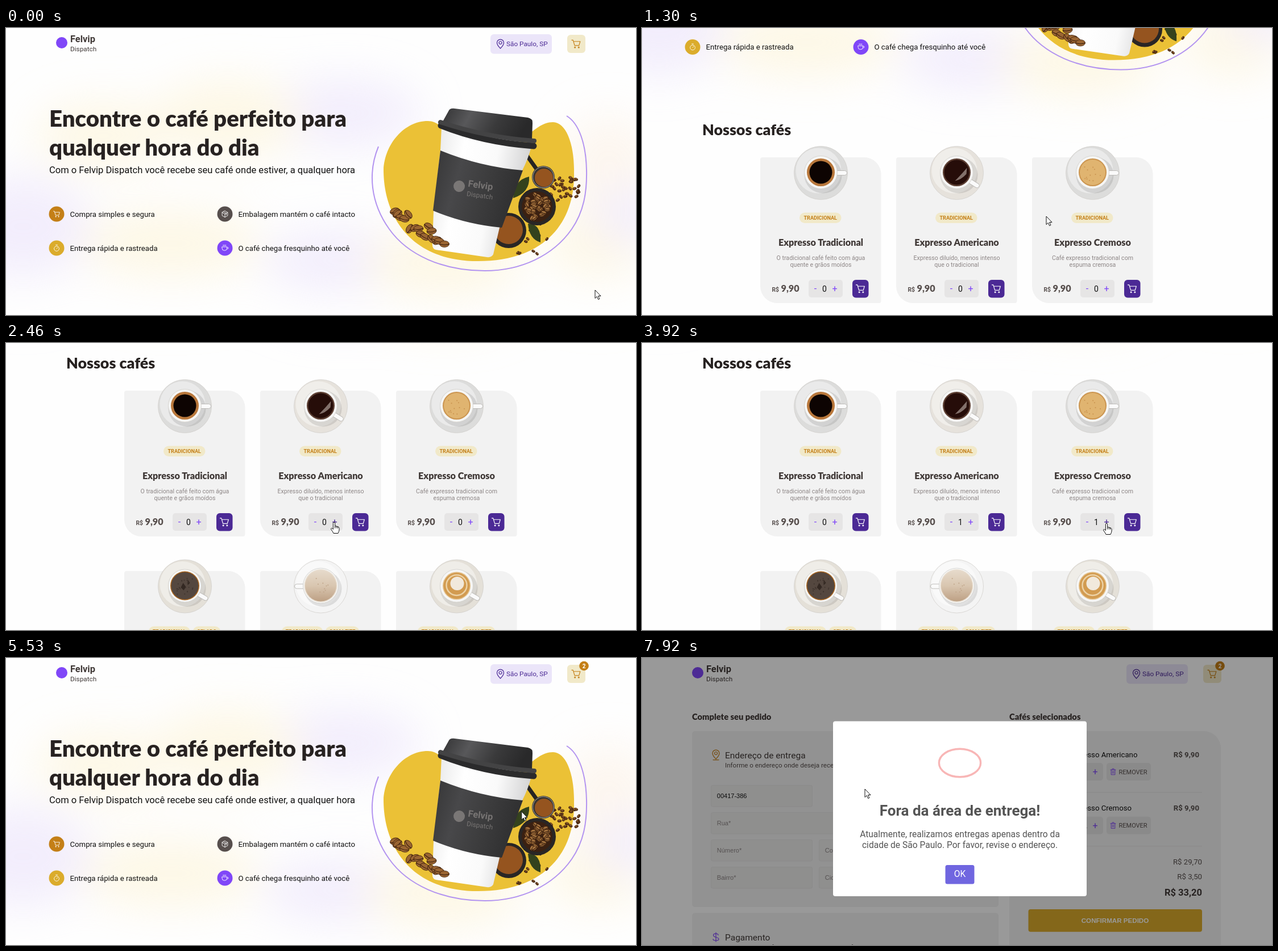
These frames come from a looping animation (1108x506 px, 8000 ms). An HTML page:

```html
<!DOCTYPE html>
<html lang="pt-BR">
<head>
<meta charset="utf-8">
<title>Felvip Dispatch</title>
<style>
  html, body { margin: 0; width: 100%; height: 100%; overflow: hidden; background: #fefefe; }
  svg { display: block; width: 1108px; height: 506px; }
  text { font-family: Roboto, sans-serif; white-space: pre; }
  .title { font-family: Lato, sans-serif; font-weight: 900; }
  .form { font-family: "Liberation Sans", Arial, sans-serif; }
  .bold { font-weight: 700; }
  .mid { text-anchor: middle; }
  .end { text-anchor: end; }
  .icon { fill: none; stroke-linecap: round; stroke-linejoin: round; }
</style>
</head>
<body>
<svg id="stage" viewBox="0 0 1108 506"></svg>
<script>
const LOOP = 8000;
const PURPLE = '#8047f8', DARK_PURPLE = '#4b2995', ORANGE = '#c47f17', GOLD = '#dbac2c';
const CREAM = '#f1e9c9', CARD = '#f2f2f2', GREY = '#e6e5e5', INK = '#403937', SOFT = '#574f4d', MUTED = '#8d8686';
const ROW1 = 582.5, ROW2 = 900.5, CARD_X = [208, 447, 686];

let seed = 77;
const random = () => (seed = seed * 16807 % 2147483647) / 2147483647;
const spread = r => (random() * 2 - 1) * r;
const repeat = (n, fn) => Array.from({ length: n }, (_, i) => fn(i)).join('');

// ---- drawing helpers ----
const text = (x, y, str, size, fill, cls = '', id = '') =>
  `<text x="${x}" y="${y}" font-size="${size}" fill="${fill}" class="${cls}" id="${id}">${str}</text>`;
const rect = (x, y, w, h, r, fill, more = '') =>
  `<rect x="${x}" y="${y}" width="${w}" height="${h}" rx="${r}" fill="${fill}" ${more}/>`;
const circle = (x, y, r, fill, more = '') => `<circle cx="${x}" cy="${y}" r="${r}" fill="${fill}" ${more}/>`;
const ellipse = (x, y, rx, ry, fill, more = '') =>
  `<ellipse cx="${x}" cy="${y}" rx="${rx}" ry="${ry}" fill="${fill}" ${more}/>`;
const path = (d, fill, more = '') => `<path d="${d}" fill="${fill}" ${more}/>`;
const icon = (name, x, y, color, scale = 1, id = '') =>
  `<path class="icon" id="${id}" d="${ICONS[name]}" stroke="${color}" stroke-width="1.25" transform="translate(${x} ${y}) scale(${scale})"/>`;
const leafCard = (x, y, w, h) => path(
  `M${x + 4} ${y}h${w - 34}a30 30 0 0 1 30 30v${h - 34}a4 4 0 0 1-4 4h${34 - w}a30 30 0 0 1-30-30v${34 - h}a4 4 0 0 1 4-4z`, CARD);

const ICONS = {
  cart: 'M-8-7h2.5l3 10h8l2.2-7.5h-12.2M-2 5.5a1 1 0 1 0 .1 0M5 5.5a1 1 0 1 0 .1 0',
  pin: 'M0 8C-4 4-6 1-6-2a6 6 0 0 1 12 0C6 1 4 4 0 8zM0-4.5a2.5 2.5 0 1 0 .1 0',
  box: 'M0-8L7-4V4L0 8L-7 4V-4zM-7-4L0 0L7-4M0 0V8M-3.5-6L3.5-2V2',
  timer: 'M0-5a6.3 6.3 0 1 0 .1 0M0 1.5L2.8-1.5M-2-8h4',
  cup: 'M-7-3H5V1A5 5 0 0 1 0 6H-2A5 5 0 0 1-7 1zM5-2h1.5a2 2 0 0 1 0 4H5M-4-8v2.5M-1-8v2.5M2-8v2.5',
  dollar: 'M0-8V8M4-3.5C4-7-4.5-7-4.5-3.2C-4.5 1 5 0 5 3.5C5 7-5 7-5 3.5',
  trash: 'M-6-4.5H6M-2-4.5V-7H2V-4.5M-4.5-4.5V7H4.5V-4.5M-1.5-1.5V4M1.5-1.5V4',
  baseline: 'M-5 8H5'
};

const specks = (n, color) => repeat(n, () => circle(spread(14), spread(14), 1, color));
const COFFEES = [
  { liquid: '#0d0402', crema: '#b9783c', radius: 20, angle: 0, saucer: '#dcdcdb', art: '' },
  { liquid: '#260d09', crema: '#5b3d31', radius: 22, angle: 32, saucer: '#e6e2dc',
    art: path('M-3 14Q8 12 17 2L18-9Q8 3-3 14', '#9a8a83', 'opacity=".8"') },
  { liquid: '#e0b470', crema: '#cb9550', radius: 22.5, angle: 0, saucer: '#dcdcdb', art: specks(12, '#c8924e') },
  { liquid: '#54473f', crema: '#a8641e', radius: 24, angle: 30, saucer: '#e4e0d8',
    art: path('M-7 2L-3-6L2 1L-2 7ZM5-12L9-6L5-2Z', '#332822') + specks(24, '#40352f') },
  { liquid: 'url(#milk)', crema: '#e9dfd2', radius: 27.5, angle: 180, saucer: '#f4f4f4', art: specks(9, '#c0a58a') },
  { liquid: '#d29b50', crema: '#e3c08a', radius: 23, angle: 30, saucer: '#e4e0d8',
    art: circle(0, -2, 18, 'none', 'stroke="#ecd2a6" stroke-width="2.5"') + circle(1, -5, 12, '#f1e9dc') }
];
function coffee(kind, x, y, scale = 1) {
  const { liquid, crema, radius, angle, saucer, art } = COFFEES[kind];
  return `<g transform="translate(${x} ${y}) scale(${scale})">` +
    circle(0, 0, 47, saucer, 'stroke="#d2d0cc" stroke-width=".8"') + circle(-4, -4, 40, '#fff', 'opacity=".4"') +
    ellipse(4, 4, 33, 32, '#000', 'opacity=".1"') +
    `<g transform="rotate(${angle})">` + rect(24, -4, 22, 8, 4, '#fafafa', 'stroke="#b8b6b3" stroke-width=".9"') + '</g>' +
    circle(0, -1, Math.max(29, radius + 3.5), '#f6f6f5', 'stroke="#cfcdca" stroke-width=".8"') +
    circle(0, -1, Math.max(24.5, radius + 1.5), crema) + circle(0, -1, radius, liquid) + art + '</g>';
}

const bean = (x, y, r, fill = '#9a6532') => `<g transform="translate(${x} ${y}) rotate(${spread(60)})">` +
  ellipse(0, 0, r, r * .66, fill, 'stroke="#3a1d0b" stroke-width=".8"') +
  path(`M${-r} 0Q0 ${r * .4} ${r} 0`, 'none', 'stroke="#2d1508" stroke-width="1"') + '</g>';

const logo = (ink, mark, cx) => circle(cx, 26, 10, mark) +
  text(113, 24.5, 'Felvip', 16.4, ink, 'bold') + text(113, 41, 'Dispatch', 11.8, ink);

const counter = (x, y, n, id) => rect(x, y, 60, 31, 5, GREY) +
  text(x + 9.5 + 2.5, y + 20.5, '-', 16, PURPLE, 'mid') +
  text(x + 28, y + 20.5, n, 14, '#111', 'mid', id && 'count' + id) +
  text(x + 46, y + 21, '+', 16, PURPLE, 'mid', id && 'plus' + id);

const tag = (x, y, w, label) => rect(x, y, w, 18.5, 9.2, CREAM) + text(x + w / 2, y + 12.7, label, 9.1, ORANGE, 'mid bold');

// ---- home page ----
function backdrop() {
  const lavender = '#e9e0fb', yellow = '#fdf3d3', peach = '#fcf0e2';
  const blobs = [
    [30, 350, 120, 90, lavender], [590, 150, 140, 60, lavender], [590, 410, 140, 55, lavender], [170, 190, 120, 60, yellow],
    [390, 160, 130, 70, yellow], [290, 380, 160, 60, yellow], [770, 415, 140, 60, yellow],
    [1060, 240, 80, 85, peach], [1040, 380, 90, 60, yellow], [1095, 330, 60, 50, lavender]
  ];
  return '<g filter="url(#soft)" opacity=".55">' + blobs.map(([x, y, rx, ry, c]) => ellipse(x, y, rx, ry, c)).join('') + '</g>';
}

function heroPicture() {
  return path('M664 250C666 205 700 164 742 164C775 164 790 220 850 220C905 220 925 166 962 166C985 166 1000 205 999 255C1001 335 955 411 830 411C710 411 664 330 664 250Z', '#ebc136') +
    path('M655 209C636 255 641 308 674 354.5C706 400 768 428 842 428C905 428 962 402 995 354.5C1016 324 1022 290 1021 250C1020 205 1008 168 986 155', 'none', 'stroke="#b394f0" stroke-width="2"') +
    repeat(34, () => bean(980 + spread(28), 284 + spread(20), 3.4)) +
    repeat(14, () => bean(925 + spread(40), 372 + spread(28), 3)) +
    path('M914 222L934 250', 'none', 'stroke="#262424" stroke-width="7" stroke-linecap="round"') +
    circle(945, 263, 20, '#383533') + circle(945, 263, 18.5, 'none', 'stroke="#a5a19d" stroke-width="1"') + circle(946, 264, 16, '#95541f') +
    path('M892 300Q893 268 920 262Q922 290 892 300M918 345Q942 345 940 378Q920 372 918 345', '#34421d') +
    circle(884, 357, 31, '#292625') + circle(884, 356, 25, '#95541f') + circle(934, 315, 33, '#292625') + circle(934, 315, 27, '#3b2112') +
    repeat(48, () => { const a = random() * 6.28, r = Math.sqrt(random()) * 22; return bean(934 + r * Math.cos(a), 315 + r * Math.sin(a), 5, '#a4733f'); }) +
    path('M766 174L924 209Q918 232 908 251L868 352L857 399Q854 405 846 404L756 391Q749 389 750 380L752 322L764 216Z', 'url(#paper)') +
    path('M764 216Q835 245 909 251L872 352Q808 346 751 322Z', 'url(#sleeve)') +
    `<g transform="translate(797 279) rotate(8) translate(-98 -26)" opacity=".75">${logo('#8b8785', '#8b8785', 98)}</g>` +
    path('M765 172Q840 202 928 208', 'none', 'stroke="#2b2b2c" stroke-width="11" stroke-linecap="round"') +
    path('M778 147Q780 141 789 142L918 158Q927 160 926 168L925 196Q840 190 768 165Z', 'url(#lid)') +
    path('M764 166Q845 193 929 199', 'none', 'stroke="#434344" stroke-width="8" stroke-linecap="round"') +
    repeat(18, i => bean(681 + i * 5.3 + spread(4), 323 + i * 3.4 + spread(15) * Math.sin(i / 17 * Math.PI), 8.5));
}

const feature = (x, y, color, name, label) =>
  circle(x, y, 13.5, color) + icon(name, x, y, '#fff', .7) + text(x + 23.5, y + 4.7, label, 13.2, '#111');

function product(i, name, lines) {
  const x = CARD_X[i], mid = x + 106.5, y = ROW1;
  return leafCard(x, y, 212.5, 257) + coffee(i, mid, y + 27.5) + tag(x + 69, y + 97.5, 73.5, 'TRADICIONAL') +
    text(mid, y + 156, name, 16.2, INK, 'title mid') +
    lines.map((line, k) => text(mid, y + 180.5 + k * 12, line, 10.6, MUTED, 'mid')).join('') +
    text(x + 20.5, y + 236.5, 'R$', 10.3, SOFT, 'bold') + text(x + 36.5, y + 236.5, '9,90', 16.2, SOFT, 'title') +
    counter(x + 85, y + 216, 0, String(i)) +
    rect(x + 162, y + 216, 28.5, 31.5, 6, DARK_PURPLE, `id="cart${i}"`) + icon('cart', x + 176, y + 231.5, '#fff', .95);
}

const teaser = (i, tags) => leafCard(CARD_X[i], ROW2, 212.5, 257) + coffee(i + 3, CARD_X[i] + 106.5, ROW2 + 27) +
  tags.map(([dx, w, label]) => tag(CARD_X[i] + dx, ROW2 + 97.5, w, label)).join('');

const milky = [[38, 72, 'TRADICIONAL'], [115, 59, 'COM LEITE']];
const home = backdrop() + heroPicture() +
  text(76, 174, 'Encontre o café perfeito para', 40.1, '#272221', 'title') +
  text(76, 225, 'qualquer hora do dia', 40.1, '#272221', 'title') +
  text(76, 256, 'Com o Felvip Dispatch você recebe seu café onde estiver, a qualquer hora', 16.55, '#111') +
  feature(89, 328, ORANGE, 'cart', 'Compra simples e segura') +
  feature(385, 328, SOFT, 'box', 'Embalagem mantém o café intacto') +
  feature(89, 388, GOLD, 'timer', 'Entrega rápida e rastreada') +
  feature(385, 388, PURPLE, 'cup', 'O café chega fresquinho até você') +
  text(106, 543.5, 'Nossos cafés', 26.8, '#272221', 'title') +
  product(0, 'Expresso Tradicional', ['O tradicional café feito com água', 'quente e grãos moídos']) +
  product(1, 'Expresso Americano', ['Expresso diluído, menos intenso', 'que o tradicional']) +
  product(2, 'Expresso Cremoso', ['Café expresso tradicional com', 'espuma cremosa']) +
  teaser(0, [[43, 72.5, 'TRADICIONAL'], [121, 48, 'GELADO']]) + teaser(1, milky) + teaser(2, milky);

const header = logo(INK, PURPLE, 98) + rect(852, 11, 108, 34.5, 6, '#ebe5f9') +
  icon('pin', 869.5, 28, DARK_PURPLE) + text(880, 32.3, 'São Paulo, SP', 11.8, DARK_PURPLE) +
  rect(987, 12, 32, 32, 6, CREAM, 'id="bag"') + icon('cart', 1002.5, 28, ORANGE, .95, 'bagIcon') +
  `<g id="badge">${circle(1016.5, 14, 8.3, ORANGE)}${text(1016.5, 17.5, '', 10, '#fff', 'mid bold', 'badgeCount')}</g>`;

// ---- order page ----
const field = (x, y, w, label, id) => rect(x + .5, y + .5, w, 37.5, 3, '#ededec', `stroke="${GREY}"`) +
  text(x + 10.8, y + 23, label, 11, MUTED, 'form', id);

const orderItem = (kind, y, name, n) => coffee(kind, 706.5, y + 60, .54) +
  text(750.5, y + 45.5, name, 13.2, '#111') + text(980, y + 45.5, 'R$ 9,90', 13.2, SOFT, 'bold end') +
  counter(751, y + 56, n) + rect(817, y + 56, 78, 31, 5, GREY) + icon('trash', 828.5, y + 71.5, PURPLE, .75) +
  text(838.5, y + 75.5, 'REMOVER', 11, SOFT) + rect(679, y + 107.5, 306, 1, 0, GREY);

const total = (y, label, value, size, fill, cls = '') =>
  text(679, y, label, size, fill, cls) + text(985, y, value, size, fill, cls + ' end');

const order =
  text(88, 109, 'Complete seu pedido', 14.7, INK, 'title') + text(646, 109, 'Cafés selecionados', 14.7, INK, 'title') +
  rect(88, 129, 539, 310, 5, CARD) + icon('pin', 130, 170, ORANGE) + icon('baseline', 130, 171.5, ORANGE) +
  text(146, 177, 'Endereço de entrega', 15.5, INK) +
  text(146, 193.3, 'Informe o endereço onde deseja receber seu pedido', 11.6, SOFT) +
  field(121, 224, 178, 'CEP*', 'cep') + field(121, 272, 472, 'Rua*') +
  field(121, 320, 178, 'Número*') + field(311, 320, 282, 'Complemento') +
  field(121, 368, 178, 'Bairro*') + field(311, 368, 235, 'Cidade*') + field(557, 368, 36, 'UF*') +
  rect(88, 449.5, 539, 100, 5, CARD) + icon('dollar', 130, 492, PURPLE) + text(146, 498, 'Pagamento', 15.5, INK) +
  text(146, 514, 'O pagamento é feito na entrega. Escolha a forma que deseja', 11.6, SOFT) +
  leafCard(646, 129, 372, 420) + orderItem(1, 129, 'Expresso Americano', 1) + orderItem(2, 223.7, 'Expresso Cremoso', 2) +
  total(364, 'Total de itens', 'R$ 29,70', 13.2, SOFT) + total(389.5, 'Entrega', 'R$ 3,50', 13.2, SOFT) +
  total(419, 'Total', 'R$ 33,20', 16.5, INK, 'bold') +
  rect(679.5, 443, 305.5, 39.7, 4, GOLD) + text(832, 467, 'CONFIRMAR PEDIDO', 11.6, '#fff', 'form bold mid');

const popup = rect(336, 111.5, 446, 308.5, 4, '#fff') +
  ellipse(559, 185, 36.6, 36.6, 'none', 'id="alertRing" stroke="#f27474" stroke-width="3.4"') +
  text(559, 278, 'Fora da área de entrega!', 26, '#545454', 'bold mid') +
  text(559, 316, 'Atualmente, realizamos entregas apenas dentro da', 15.6, '#545454', 'mid') +
  text(559, 335, 'cidade de São Paulo. Por favor, revise o endereço.', 15.6, '#545454', 'mid') +
  rect(533.5, 365, 51, 33.5, 3.5, '#7066e0') + text(559, 386.5, 'OK', 15.6, '#fff', 'mid');

const gradient = (id, coords, ...colors) => `<linearGradient id="${id}" ${coords}>` +
  colors.map((c, i) => `<stop offset="${i / (colors.length - 1)}" stop-color="${c}"/>`).join('') + '</linearGradient>';

document.getElementById('stage').innerHTML = '<defs>' +
  '<filter id="soft" x="-20%" y="-50%" width="140%" height="200%"><feGaussianBlur stdDeviation="38"/></filter>' +
  gradient('paper', 'y2=".25"', '#e4e4e4', '#fff', '#fafafa', '#d2d2d3') +
  gradient('sleeve', 'y2=".25"', '#353536', '#48484a', '#3c3c3d', '#303031') +
  gradient('lid', 'y2=".2"', '#333334', '#58585a', '#3a3a3b', '#29292a') +
  gradient('milk', 'x2="0" y2="1"', '#e6dacb', '#d9c6b0', '#bda084') + '</defs>' +
  `<g id="page"><g id="home">${home}</g><g id="order">${order}</g>${header}</g>` +
  rect(0, 0, 1108, 506, 0, '#000', 'id="shade"') + `<g id="popup">${popup}</g>` +
  '<path id="cursor" fill="#fff" stroke="#111" stroke-width="1" stroke-linejoin="round"/>';

// ---- motion ----
const ARROW = 'M0 0V14.5L3.3 11.4L5.6 16.6L7.9 15.6L5.6 10.5H10Z';
const HAND = 'M-1.6 1.6Q-1.5 0 0 0Q1.5 0 1.6 1.6V6.5L4 7L6 7.6L8 8.4Q9 9 9 10.5V14Q8.5 16.5 7 19.5H-1Q-2.5 16-5 13Q-6 11.5-4.8 10.5Q-3.5 10-1.6 12.5ZM1.6 6.5V10.5M4.2 7.2V10.5M6.6 8V10.8';

const CURSOR = [
  [70, 1036, 462], [110, 970, 395], [380, 970, 395], [1000, 711, 332], [1480, 711, 332], [1990, 500, 365],
  [2060, 500, 365], [2400, 577, 316], [2660, 577, 316], [2810, 603, 318], [2960, 624, 318], [3100, 624, 318],
  [3480, 890, 318], [3660, 817, 318], [4250, 817, 318], [4800, 862, 318], [5400, 862, 318], [5800, 1040, 130],
  [6160, 1010, 20], [6750, 1010, 20], [6900, 372, 164], [7100, 372, 164], [7300, 235, 244], [7450, 235, 244], [7650, 392, 231]
];
// The page moves in hard steps, one per wheel tick.
const SCROLL = [[0, 0], [950, 60], [1020, 125.5], [1090, 190], [1160, 250], [1230, 305], [1300, 354.5], [1370, 425], [1440, 498.5],
  [5000, 487.5], [5070, 220], [5140, 0]];
const POPUP_START = 7785;
const POPUP_SCALE = [[POPUP_START, .667], [POPUP_START + 135, 1], [POPUP_START + 240, .905], [POPUP_START + 300, .952]];

const smooth = k => k * k * (3 - 2 * k);
const hold = () => 0;
const clamp = v => Math.min(1, Math.max(0, v));
function sample(track, t, ease) {
  const next = track.findIndex(key => key[0] > t);
  if (next < 1) return (next ? track[track.length - 1] : track[0]).slice(1);
  const a = track[next - 1], b = track[next], k = ease((t - a[0]) / (b[0] - a[0]));
  return a.slice(1).map((v, i) => v + (b[i + 1] - v) * k);
}

const el = {};
document.querySelectorAll('[id]').forEach(node => { if (node.id) el[node.id] = node; });
const set = (id, name, value) => el[id].setAttribute(name, value);
const show = (id, on) => set(id, 'display', on ? 'inline' : 'none');

function render(t) {
  const [x, y] = sample(CURSOR, t, smooth);
  const [scroll] = sample(SCROLL, t, hold);
  const ordering = t >= 6430;
  const over = (cx, cy, w, h) => Math.abs(x - cx) <= w && Math.abs(y + scroll - cy) <= h;
  let pointing = false;
  const hover = (id, hit, on, off) => {
    pointing = pointing || hit;
    set(id, 'fill', hit ? on : off);
  };

  set('page', 'transform', `translate(0 ${-scroll})`);
  show('home', !ordering);
  show('order', ordering);
  CARD_X.forEach((left, i) => {
    hover('cart' + i, !ordering && over(left + 176, ROW1 + 231.5, 14.5, 16), PURPLE, DARK_PURPLE);
    hover('plus' + i, !ordering && over(left + 131, ROW1 + 231.5, 9, 16), DARK_PURPLE, PURPLE);
  });
  const onBag = over(1003, 28, 16, 16);
  hover('bag', onBag, ORANGE, CREAM);
  set('bagIcon', 'stroke', onBag ? CREAM : ORANGE);

  el.count1.textContent = t < 2600 ? 0 : 1;
  el.count2.textContent = t < 3920 ? 0 : t < 4190 ? 1 : 2;
  show('badge', t >= 3000);
  el.badgeCount.textContent = t < 4870 ? 1 : 2;

  const filled = t >= 7430;
  el.cep.textContent = filled ? '00417-386' : 'CEP*';
  set('cep', 'fill', filled ? '#111' : MUTED);

  const age = t - POPUP_START, turn = 1 - Math.pow(1 - clamp(age / 500), 2.35);
  show('popup', age >= 0);
  set('shade', 'opacity', .4 * clamp(age / 100));
  set('popup', 'transform', `translate(559 265.5) scale(${sample(POPUP_SCALE, t, smooth)[0]}) translate(-559 -265.5)`);
  set('alertRing', 'ry', 36.6 * Math.abs(Math.cos((1 - turn) * 100 * Math.PI / 180)));
  set('alertRing', 'opacity', turn);

  set('cursor', 'd', pointing ? HAND : ARROW);
  set('cursor', 'transform', `translate(${x} ${y})`);
}

const start = performance.now();
(function tick() {
  render((performance.now() - start) % LOOP);
  requestAnimationFrame(tick);
})();
</script>
</body>
</html>
```
